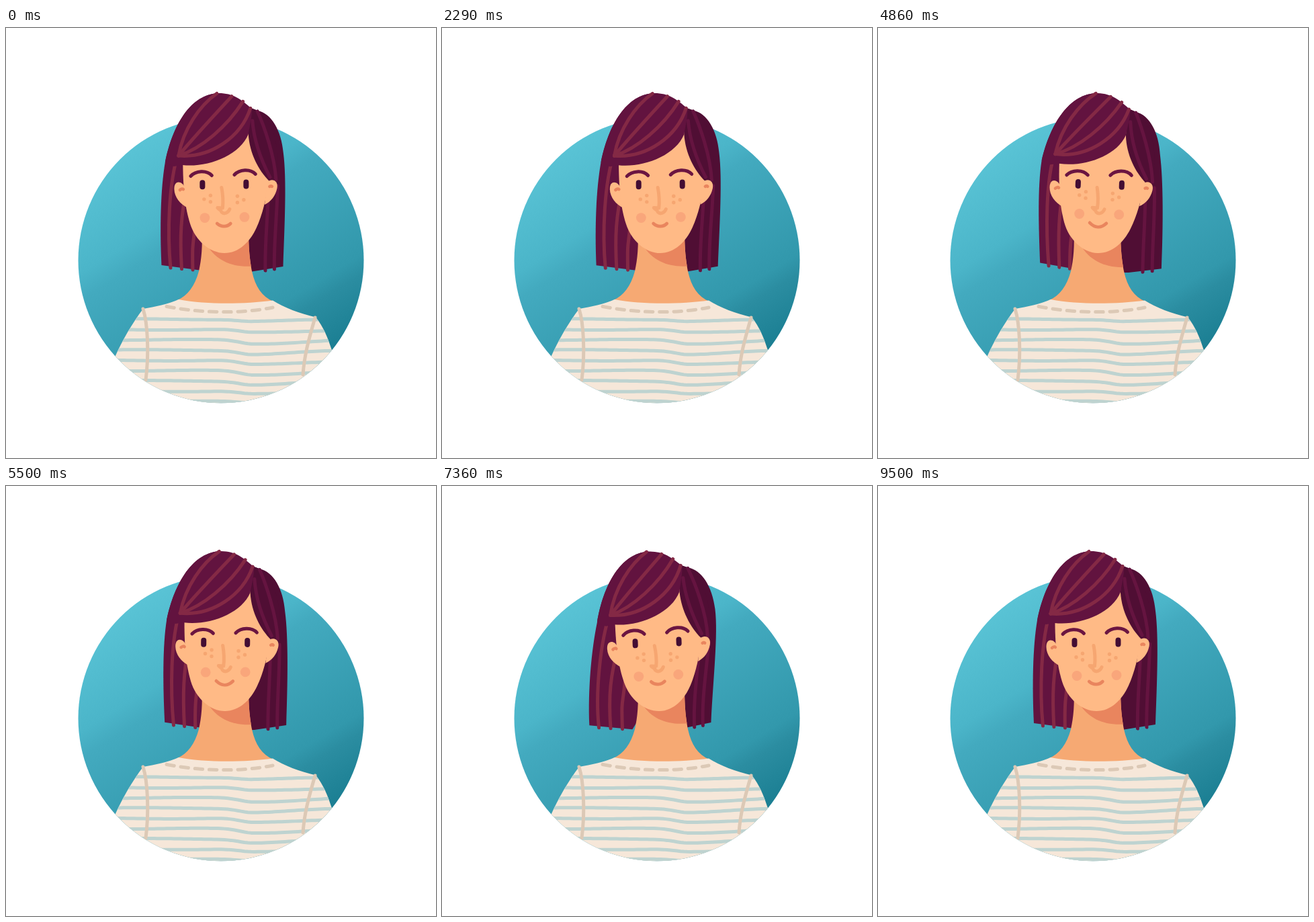
Write an HTML page with a canvas that moves like this. It is 640 px wide and 640 px high and loops after 9.57 s.

```html
<!DOCTYPE html>
<html lang="en">
<head>
<meta charset="utf-8">
<title>Portrait</title>
<style>
html, body { margin: 0; width: 100%; height: 100%; overflow: hidden; background: #fff; }
canvas { display: block; width: 640px; height: 640px; }
</style>
</head>
<body>
<canvas id="stage" width="640" height="640"></canvas>
<script>
const ctx = document.getElementById('stage').getContext('2d');
const LOOP = 9.57;
const PIVOT = { x: 325, y: 375 };
const COLOR = {
  hair: '#62133f', strand: '#842945', hairDark: '#500e34', strandDark: '#651440',
  skin: '#ffba86', neck: '#f6a973', shade: '#e9855e', nose: '#f6a671', blush: '#f9a67b',
  eye: '#430d33', brow: '#6b1541', knit: '#f6e7d9', stripe: '#bed3d0', seam: '#dcc9b6'
};

const lerp = (a, b, u) => a + (b - a) * u;
const smooth = u => (u = Math.min(1, Math.max(0, u)), u * u * (3 - 2 * u));
const pulse = (t, center, width) => Math.exp(-(((t - center) / width) ** 2));

// Motion in pixels: the crown leans, the hair ends follow a little later.
const tilt = t => 14 * pulse(t, 4.15, 1.3) - 6 * pulse(t, 1.5, 0.85) - 10.8 * pulse(t, 7, 1.05);
const swing = t => 10.8 * pulse(t, 4.45, 1.15) - 6.5 * pulse(t, 1.55, 0.7)
  - 13 * pulse(t, 7.55, 0.75) + 3.5 * pulse(t, 9.15, 0.25);
const glance = t => 3 * pulse(t, 3.3, 0.8);
const smiling = t => smooth(t - 2.4) * (1 - smooth(t - 6.2));

const still = (x, y) => [x, y];

function makePath(d, map = still) {
  return new Path2D(d.replace(/(-?[\d.]+) (-?[\d.]+)/g, (_, x, y) =>
    map(+x, +y).map(v => v.toFixed(3)).join(' ')));
}
function fill(d, color, map) {
  ctx.fillStyle = color;
  ctx.fill(makePath(d, map));
}
function stroke(d, color, width, map) {
  ctx.strokeStyle = color;
  ctx.lineWidth = width;
  ctx.stroke(makePath(d, map));
}
function dot(x, y, r, color, map) {
  ctx.fillStyle = color;
  ctx.beginPath();
  ctx.arc(...map(x, y), r, 0, 2 * Math.PI);
  ctx.fill();
}
function clipped(path, draw) {
  ctx.save();
  ctx.clip(path);
  draw();
  ctx.restore();
}

const disc = new Path2D();
disc.arc(320, 345.8, 212.5, 0, 2 * Math.PI);
const sky = ctx.createLinearGradient(210, 166, 430, 526);
[[0, '#59c3d5'], [0.28, '#4bb5c9'], [0.36, '#43aabf'], [0.74, '#3298ac'], [0.8, '#2b8da1'], [1, '#187c90']]
  .forEach(([at, color]) => sky.addColorStop(at, color));

const NECK = 'M291 300 C293 322 291 345 287 362 C281 384 270 399 255 405 L290 425 L365 425 '
  + 'L398 407 C381 400 371 385 366 362 C363 345 361 330 361 300 Z';
const SWEATER = 'M204 418 C222 415 241 411 257 404 C300 412 355 411 397 405.500 '
  + 'C413 416 438 425 461 430.500 C472 444 479 460 487 486 L487 570 L150 570 L161 492 C174 463 187 441 204 418 Z';

// Each stripe runs level, dips right of the middle and eases back up.
function stripePath(row) {
  const depth = 6.5 * Math.sqrt(Math.sin(Math.PI * (row + 0.6) / 9));
  let d = '';
  for (let x = 150; x <= 490; x += 5) {
    const dip = depth * pulse(x, 368, x < 368 ? 28 : 95);
    const wave = 0.7 * Math.sin(x / 40 + row * 2);
    d += `${d ? 'L' : 'M'}${x} ${433.5 + 15.3 * row + dip + wave}`;
  }
  return d;
}

function drawSweater() {
  clipped(disc, () => {
    fill(SWEATER, COLOR.knit);
    clipped(makePath(SWEATER), () => {
      for (let row = 0; row < 9; row++) stroke(stripePath(row), COLOR.stripe, 5);
    });
    stroke('M204 418 C211 440 213 485 208 524', COLOR.seam, 5);
    stroke('M460 431 C452 459 444 485 442 516', COLOR.seam, 5);
    ctx.setLineDash([11.5, 9.8]);
    stroke('M239 414.500 C290 424 345 426 397 416', COLOR.seam, 5);
    ctx.setLineDash([]);
  });
}

function drawBackHair(hair) {
  fill('M317 97 C275 98 248 145 237 200 C230 240 229 300 231.500 353 L292 361 L330 300 L340 150 Z', COLOR.hair, hair);
  fill('M362 118 L375 123 C395 127 410 152 413 186 C418 225 415 290 412.500 355 L366 362.500 L330 364 L330 300 L350 150 Z',
    COLOR.hairDark, hair);
  for (let i = 0; i < 3; i++) {
    const x = 245 + 16.5 * i, y = 357 + 1.5 * i, top = 185 + 50 * i;
    stroke(`M${x + 12 - 4 * i} ${top} C${x - 3 + 2 * i} ${top + 45} ${x - 5 + 2 * i} ${y - 50} ${x} ${y}`,
      COLOR.strand, 5, hair);
  }
  for (let i = 0; i < 2; i++) {
    const x = 386 + 13.5 * i, y = 361 - 2 * i;
    stroke(`M${x + 5} 235 C${x + 4} 280 ${x - 1} 320 ${x} ${y}`, COLOR.strandDark, 5, hair);
  }
}

function drawFace(head, ears, face, smile) {
  fill('M266 237 C262 227 250 226 250.500 240 C251 252 259 262 271 268 Z', COLOR.skin, ears);
  fill('M263.500 150 L263.500 205 C264 245 267 268 274 291 C282 317 304 335 325 335 '
    + 'C346 335 363 319 373 297 C382 277 387 255 392 226 L361 140 Z', COLOR.skin, head);
  stroke('M259 241 C261 239 263 239 264 240', COLOR.shade, 4.5, ears);

  const cheeks = (x, y) => face(x, y - 5 * smile);
  for (const side of [-1, 1]) {
    const x = 325 + side * 32.5, y = 232.8 - side * 0.3, brow = 218.5 - side;
    dot(325.5 + side * 29.5, 282 - side * 0.5, 7.4, COLOR.blush, cheeks);
    for (const [out, down] of [[20, 0], [29.5, 5.5], [20, 9.5]])
      dot(324.5 + side * out, 249.8 + down + side * 0.5, 2.7, COLOR.nose, cheeks);
    stroke(`M${x} ${y - 3} L${x} ${y + 3}`, COLOR.eye, 8, face);
    stroke(`M${x - 17.5} ${brow + 1} C${x - 10} ${brow - 7} ${x + 6} ${brow - 8.5} ${x + 14} ${brow}`,
      COLOR.brow, 5, face);
  }
  stroke('M321 237.500 C323 248 323.500 258 322.500 268 L315 267.500 C316 270 320 270 321 274 '
    + 'C325 278 331 275 333 269.500', COLOR.nose, 5, face);

  const wide = 10 + 2.4 * smile, corner = 291 - smile * 0.7, low = 296.5 + 1.6 * smile;
  stroke(`M${324.3 - wide} ${corner} C320 ${low} 329 ${low} ${324.3 + wide} ${corner}`, COLOR.shade, 4.8, face);
}

function drawFrontHair(hair, ears) {
  fill('M361 159 C363 187 376 212 392 228 L401 228 C412 190 398 134 375 123 L362 118 Z', COLOR.hairDark, hair);
  stroke('M374.500 124 C384 145 400 190 402 226', COLOR.strandDark, 5, hair);
  stroke('M367 138 C369 165 379 195 393 222', COLOR.strandDark, 5, hair);
  fill('M263 204 C300 208 348 190 361 158 C363 145 367 130 366 120 C350 106 338 97 317 97 '
    + 'C275 98 248 145 237 200 L250 206 Z', COLOR.hair, hair);
  for (let i = 0; i < 4; i++) {
    const u = i / 3;
    stroke(`M${314 + 75 * u - 25 * u * u} ${97.5 + 22 * u ** 1.5} `
      + `C${lerp(289, 350, u)} ${lerp(115, 162, u)} ${lerp(264, 305, u)} ${lerp(150, 194, u)} 257 190`,
      COLOR.strand, 5, hair);
  }
  fill('M389 229 C397 223 406 228 403.500 239 C401 250 395 258 385 263 Z', COLOR.skin, ears);
  stroke('M392.500 236 C394 235 395 235 396 236', COLOR.shade, 4.5, ears);
}

function draw(t) {
  const angle = tilt(t) / 278, sway = swing(t), gaze = glance(t);
  const cos = Math.cos(angle), sin = Math.sin(angle);

  const head = (x, y) => {
    const dx = x - PIVOT.x, dy = y - PIVOT.y;
    return [PIVOT.x + dx * cos - dy * sin, PIVOT.y + dx * sin + dy * cos];
  };
  const ears = (x, y) => head(x - gaze * 0.5, y);
  const face = (x, y) => head(x + gaze, y);
  const hair = (x, y) => {
    const [hx, hy] = head(x, y);
    const weight = smooth((y - 190) / 150);
    const reach = lerp(0.55, 1, Math.min(1, Math.abs(x - PIVOT.x) / 90));
    return [hx + (sway - angle * 20) * weight * reach, hy];
  };

  ctx.fillStyle = '#fff';
  ctx.fillRect(0, 0, 640, 640);
  ctx.lineCap = ctx.lineJoin = 'round';
  ctx.fillStyle = sky;
  ctx.fill(disc);

  drawBackHair(hair);
  fill(NECK, COLOR.neck);
  clipped(makePath(NECK), () =>
    fill('M300 324 C314 348 341 358 372 354 L372 300 L300 300 Z', COLOR.shade, head));
  drawSweater();
  drawFace(head, ears, face, smiling(t));
  drawFrontHair(hair, ears);
}

function tick() {
  const ms = performance.now() % (LOOP * 1000);
  draw(Math.min(9.5, Math.floor((ms + 5) * 0.014) / 14));
  requestAnimationFrame(tick);
}
tick();
</script>
</body>
</html>
```
